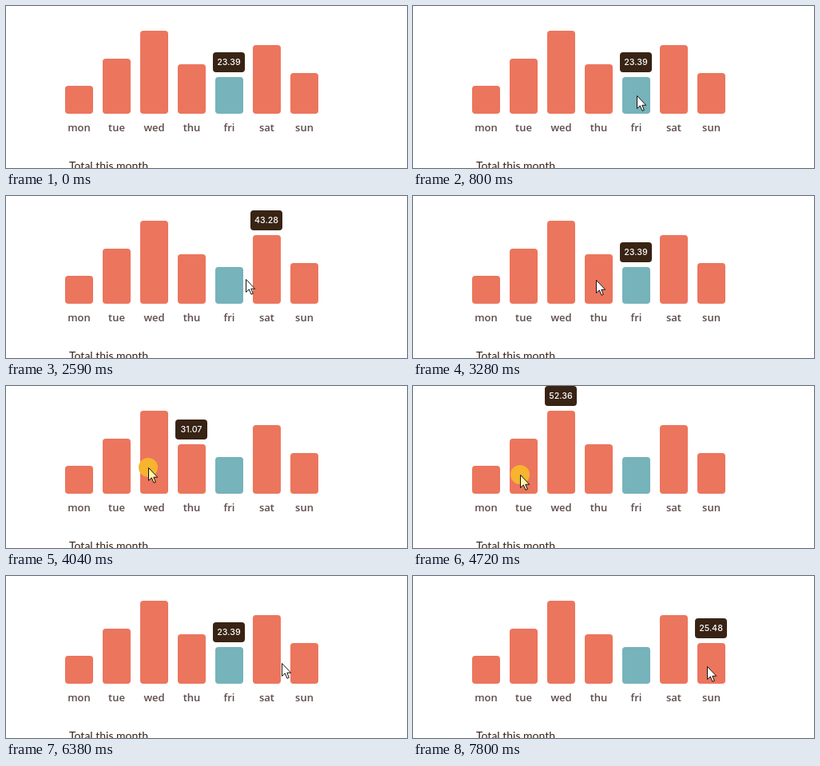
Recreate the animation shown at these times as an HTML page. Size 502 by 203 pixels, loop 8 s.

```html
<!DOCTYPE html>
<html lang="en">
<head>
<meta charset="utf-8">
<title>Weekly spending chart</title>
<style>
  html, body { margin: 0; width: 100%; height: 100%; overflow: hidden; background: #fff; }
  svg { display: block; width: 502px; height: 203px; }
  text { text-anchor: middle; }
  .day { font: 600 13px "Open Sans", sans-serif; fill: #5d4c4a; }
  .tip text { font: 500 10.7px Inter, sans-serif; fill: #fff; }
  .total { font: 14px Lato, sans-serif; fill: #382314; text-anchor: start; }
  #pointer circle { display: none; fill: #f7b42f; }
  #pointer path { fill: #fff; stroke: #111; }
  #pointer.pressed circle { display: inline; }
  #pointer.pressed path { fill: #fdf5ae; }
</style>
</head>
<body>
<svg viewBox="0 0 502 203">
  <g id="bars"></g>
  <text class="total" x="79" y="205">Total this month</text>
  <g class="tip" id="tip">
    <rect width="40" height="25" rx="4" fill="#382314"/>
    <text id="amount" x="20" y="16"></text>
  </g>
  <g id="pointer">
    <circle r="12"/>
    <path d="M.5 .5V16.5L4.3 13L7 19.3L9.3 18.3L6.8 12.3H11.7Z"/>
  </g>
</svg>
<script>
const LOOP = 8000, BASE = 135, ENTER = 290;
const CLICK_TIME = 140, TIP_DELAY = 130;
const $ = id => document.getElementById(id);

const names = ['mon', 'tue', 'wed', 'thu', 'fri', 'sat', 'sun'];
const amounts = [17.45, 34.91, 52.36, 31.07, 23.39, 43.28, 25.48];
const FRI = 4;
const barX = i => 74 + 47 * i;
const barTop = i => BASE - Math.round(amounts[i] * 1.985);

// Pointer stops: x, y, arrival, stay. Every stop with a stay has one click.
const stops = [
  [384, 203, 250, 0], [272, 114, 730, 0],
  [327, 103, 1660, 860], [277, 104, 2740, 220], [229, 105, 3280, 320],
  [178, 102, 3840, 210], [134, 111, 4500, 540], [277, 111, 5630, 420],
  [357, 109, 6590, 0], [367, 115, 6700, 370], [368, 113, 7200, 330]
].map(([x, y, arrive, stay]) => ({ x, y, arrive, leave: arrive + stay, click: arrive + stay * 0.4 }));
const clicks = stops.filter(stop => stop.leave > stop.arrive);

$('bars').innerHTML = names.map((name, i) => `
  <rect x="${barX(i)}" y="${barTop(i)}" width="35" height="${BASE - barTop(i)}" rx="4"
    fill="${i === FRI ? '#76b3bb' : '#ec755d'}"/>
  <text class="day" x="${barX(i) + 17.5}" y="157">${name}</text>`).join('');

function pointerAt(t) {
  const i = stops.findLastIndex(stop => stop.arrive <= t);
  const from = stops[i], to = stops[i + 1] || from;
  const u = t > from.leave && to !== from ? (t - from.leave) / (to.arrive - from.leave) : 0;
  const ease = u * (2 - u);
  const mix = (a, b) => Math.round(a + (b - a) * ease);
  return `translate(${mix(from.x, to.x)} ${mix(from.y, to.y)})`;
}

function draw(t) {
  const picked = clicks.findLast(stop => stop.click + TIP_DELAY <= t);
  const shown = picked ? Math.floor((picked.x - barX(0)) / 47) : FRI;
  $('tip').setAttribute('transform', `translate(${barX(shown) - 3} ${barTop(shown) - 31})`);
  $('amount').textContent = amounts[shown];

  const pointer = $('pointer');
  pointer.style.display = t < ENTER ? 'none' : '';
  if (t < ENTER) return;
  pointer.setAttribute('transform', pointerAt(t));
  pointer.classList.toggle('pressed',
    clicks.some(({ click }) => t >= click && t < click + CLICK_TIME));
}

const start = performance.now();
function frame() {
  draw((performance.now() - start) % LOOP);
  requestAnimationFrame(frame);
}
frame();
</script>
</body>
</html>
```
